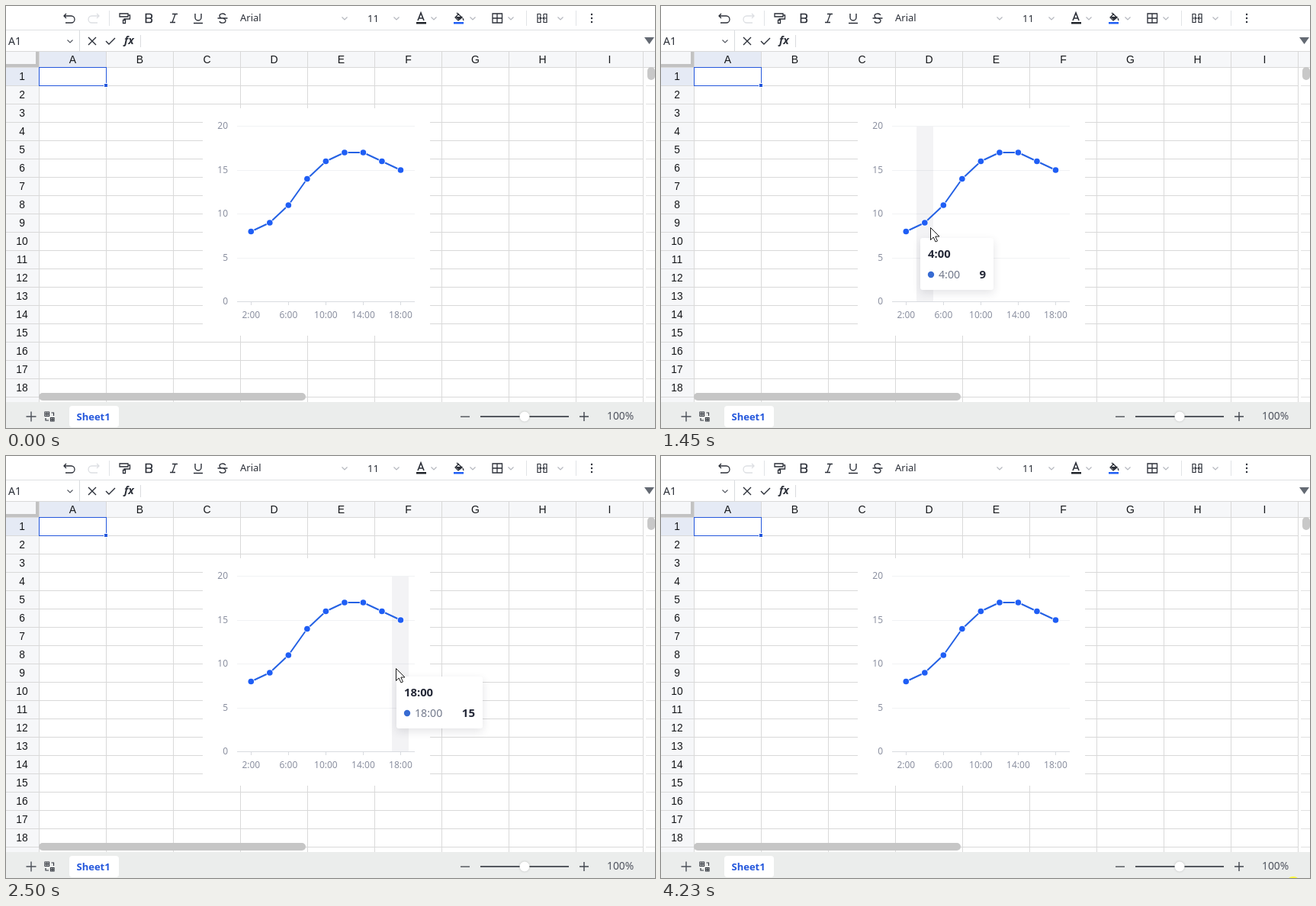
An HTML page with a canvas for the animation above (4360 ms loop, 851 by 553 pixels).

```html
<!DOCTYPE html>
<html lang="en">
<head>
<meta charset="utf-8">
<title>Spreadsheet chart hover</title>
<style>
html, body { margin: 0; width: 100%; height: 100%; overflow: hidden; background: #fff; }
canvas { display: block; }
</style>
</head>
<body>
<canvas id="stage" width="851" height="553"></canvas>
<script>
const W = 851, H = 553, LOOP = 4360;
const UI = '"Noto Sans", "Open Sans", sans-serif';
const GRID = '"Liberation Sans", Arial, sans-serif';
const BLUE = '#1f5ef5', INK = '#2b2f38', PALE = '#b4b7be', RULE = '#d9d9d9';
const values = [8, 9, 11, 14, 16, 17, 17, 16, 15];
const plot = { left: 303, right: 536, top: 157.5, bottom: 387.5 };

// Pointer path: time, x, y
const path = [
  [390, 196, 495], [540, 213, 395], [890, 278, 293], [1170, 298, 291],
  [1450, 353, 290], [1940, 442, 281], [2220, 484, 275], [2780, 541, 279],
  [3130, 605, 262], [3410, 705, 250], [3690, 826, 305], [3830, 837, 400],
  [3970, 839, 540]
];

const stage = document.getElementById('stage').getContext('2d');
const sheet = document.createElement('canvas');
sheet.width = W;
sheet.height = H;
let g = sheet.getContext('2d');

function rect(x, y, w, h, fill) {
  g.fillStyle = fill;
  g.fillRect(x, y, w, h);
}

function round(x, y, w, h, r, fill) {
  g.fillStyle = fill;
  g.beginPath();
  g.roundRect(x, y, w, h, r);
  g.fill();
}

function circle(x, y, r, fill) {
  g.fillStyle = fill;
  g.beginPath();
  g.arc(x, y, r, 0, Math.PI * 2);
  g.fill();
}

function text(str, x, y, font, fill, align = 'left') {
  g.font = font;
  g.fillStyle = fill;
  g.textAlign = align;
  g.fillText(str, x, y);
}

function draw(d, x = 0, y = 0, color = INK, width = 1.3) {
  g.save();
  g.translate(x, y);
  g.strokeStyle = color;
  g.lineWidth = width;
  g.stroke(new Path2D(d));
  g.restore();
}

const chevron = (x, y, color = PALE) => draw('M-3.5-1.5 0 2 3.5-1.5', x, y, color, 1.2);
const pointX = i => 321.3 + i * 24.52;
const pointY = v => plot.bottom - v * 11.5;
const hour = i => (i * 2 + 2) + ':00';

function drawToolbar() {
  draw('M-4-6-7-3-4 0M-7-3H2.5A4.4 4.4 0 0 1 2.5 6H-5', 83, 16);
  draw('M4-6 7-3 4 0M7-3H-2.5A4.4 4.4 0 0 0-2.5 6H5', 115, 16, '#dddfe3');
  for (const x of [135, 682, 747]) rect(x, 6, 1, 20, '#e1e3e6');

  draw('M-6.500-5.500H4.500V-1.500H-6.500ZM4.500-3.500H7V1.500H-.5V3M-2 3H1V7H-2Z', 155.5, 15.5);
  draw('M-4-5.500H1A2.700 2.700 0 0 1 1 0H-4ZM-4 0H1.500A2.800 2.800 0 0 1 1.500 5.500H-4Z', 187.5, 16, INK, 1.7);
  draw('M-2-5.500H5M-5 5.500H2M2-5.500-2 5.500', 220, 16);
  draw('M-4-6V-1A4 4 0 0 0 4-1V-6M-6 6.500H6', 252, 16, INK, 1.4);
  draw('M4-4C2-7-4-6.500-4-3C-4-1-2 0 0 0C3 1 4 2 4 3C4 7-3 7-4 4M-6.500 0H6.500', 284, 16);

  text('Arial', 307, 20, '13px ' + UI, INK);
  text('11', 474, 21, '13px ' + UI, INK);
  for (const x of [444, 512, 561, 612, 662, 727]) chevron(x, 16);

  draw('M-4 4 0-6 4 4M-2.600 1H2.600', 544, 15, INK, 1.6);
  rect(538, 21, 13, 2.500, '#1f2329');
  g.fillStyle = INK;
  g.fill(new Path2D('M589 14H599L594 18.500Z'));
  draw('M-3-6 4 0-1 4-5 0 0-5M5 1 6 4', 594, 15);
  rect(587, 21, 13, 2.500, BLUE);
  draw('M-6-6H6.500V6H-6ZM0-6V6M-6 0H6.500', 644, 16);
  draw('M-2-5.500H-6V5.500H-2V2.500M-2-5.500V-2.500M2-5.500H6V5.500H2V2.500M2-5.500V-2.500M-6 0H-1M1 0H6M-3-2-1 0-3 2M3-2 1 0 3 2', 703, 16, INK, 1.2);
  for (const y of [11, 16, 21]) circle(768, y, 1.2, INK);

  rect(0, 31, W, 1, '#dfe1e4');
  text('A1', 3, 51, '14px ' + UI, INK);
  chevron(84, 46, '#555962');
  rect(96, 32, 1, 27, '#d9dbde');
  draw('M-5-5 5 5M5-5-5 5', 113, 46, INK, 1.4);
  draw('M-6 0-2 4 6-4', 137, 46, INK, 1.4);
  text('fx', 155, 50, 'italic 600 14px ' + UI, INK);
  rect(176, 38, 1, 16, '#d9dbde');
  g.fillStyle = '#646a73';
  g.fill(new Path2D('M837 41H850L843.500 50Z'));
  rect(0, 59, W, 1, RULE);
}

function drawCells() {
  rect(0, 60, W, 20, '#f6f7f9');
  rect(0, 80, 43, 439, '#f6f7f9');
  rect(44, 60, 87, 20, '#e5eaf5');
  rect(0, 81, 43, 23, '#e5eaf5');
  rect(0, 80, W, 1, RULE);
  rect(43, 60, 1, 459, RULE);

  for (let c = 0; c < 9; c++) {
    const x = 43 + c * 88;
    rect(x + 88, 60, 1, 459, RULE);
    text('ABCDEFGHI'[c], x + 44.5, 75, '14px ' + GRID, '#15171a', 'center');
  }
  for (let r = 0; r < 18; r++) {
    const y = 80 + r * 24;
    rect(0, y + 24, 836, 1, RULE);
    rect(839, y + 24, 12, 1, '#e1e1e1');
    text(r + 1, 21, y + 17, '13.8px ' + GRID, '#15171a', 'center');
  }
  rect(39, 60, 4, 20, '#c2c2c2');
  rect(0, 76, 43, 4, '#c2c2c2');

  g.strokeStyle = '#2457dc';
  g.lineWidth = 1;
  g.strokeRect(43.5, 80.5, 88, 24);
  rect(128, 101, 6, 6, '#fff');
  rect(129, 102, 4, 4, '#2457dc');
  round(841, 80, 10, 17, 5, '#c8c8c8');
  round(43, 507, 350, 10, 5, '#c6c6c6');
}

function drawFooter() {
  rect(0, 519, W, 34, '#ebedec');
  draw('M-6.500 0H6.500M0-6.500V6.500', 33, 538, '#4c5059', 1.4);
  draw('M-6-6H-.5V-.5H-6ZM-3.300-6V-.5M-6-3.300H-.5M1.500 1.500H6V6H1.500ZM3.800 1.500V6M1.500 3.800H6M2.500-5H5.500V-1M-5 2V5H-1', 57, 538, '#363a42', 1.2);
  round(83, 524, 65, 28, 4, '#fff');
  text('Sheet1', 92.5, 543, 'bold 13px ' + UI, '#2457dc');
  rect(596, 537.500, 12, 1.3, '#42464e');
  rect(622, 537, 116, 2, '#54585f');
  g.save();
  g.shadowColor = 'rgba(0,0,0,.2)';
  g.shadowBlur = 3;
  circle(680, 538, 6.5, '#fff');
  g.restore();
  draw('M-6 0H6M0-6V6', 758, 538, '#42464e', 1.4);
  text('100%', 788, 542, '13.800px ' + UI, '#50545f');
}

function drawChart(active) {
  rect(258, 134, 298, 298, '#fff');
  for (let v = 0; v <= 20; v += 5) {
    const y = Math.floor(pointY(v));
    if (v) rect(plot.left, y, 233, 1, '#f1f2f4');
    text(v, 291, y + 4, '12px ' + UI, '#8b90a0', 'right');
  }
  if (active >= 0) {
    rect(Math.round(pointX(active) - 11), 158, 22, 229, 'rgba(30,35,60,.05)');
  }
  rect(plot.left, 387, 233, 1, '#d9dbe0');
  for (let i = 0; i < values.length; i += 2) {
    rect(Math.floor(pointX(i)), 388, 1, 4, '#d9dbe0');
    text(hour(i), pointX(i), 409, '12px ' + UI, '#8b90a0', 'center');
  }
  g.beginPath();
  values.forEach((v, i) => g.lineTo(pointX(i), pointY(v)));
  g.strokeStyle = '#2461e4';
  g.lineWidth = 2;
  g.lineJoin = 'round';
  g.stroke();
  values.forEach((v, i) => {
    circle(pointX(i), pointY(v), 4.7, '#fff');
    circle(pointX(i), pointY(v), 3.8, BLUE);
  });
}

function drawTooltip(x, y, i) {
  const label = hour(i), value = String(values[i]);
  const w = 96 + (label.length - 4) * 8 + (value.length - 1) * 9;
  g.save();
  g.shadowColor = 'rgba(30,35,50,.12)';
  g.shadowBlur = 12;
  g.shadowOffsetY = 4;
  round(x, y, w, 68, 3, '#fff');
  g.restore();
  text(label, x + 10, y + 26, 'bold 14.800px ' + UI, '#252938');
  circle(x + 14, y + 48, 4.2, '#376bd2');
  text(label, x + 24, y + 53, '14.200px ' + UI, '#747b8d');
  text(value, x + w - 10, y + 53, 'bold 15px ' + UI, '#252938', 'right');
}

function drawPointer(x, y) {
  g.save();
  g.translate(x + 0.5, y + 0.5);
  const arrow = new Path2D('M0 0V16L3.700 12.500 6.500 18.500 9 17.400 6.300 11.500H11.500Z');
  g.fillStyle = '#fff';
  g.fill(arrow);
  g.strokeStyle = '#1c1c1c';
  g.lineWidth = 1;
  g.stroke(arrow);
  g.restore();
}

function slope(i, k) {
  const a = path[Math.max(i - 1, 0)], b = path[Math.min(i + 1, path.length - 1)];
  return (b[k] - a[k]) / (b[0] - a[0]);
}

function pointerAt(t) {
  t = Math.min(Math.max(t, path[0][0]), path[path.length - 1][0]);
  let i = 0;
  while (i < path.length - 2 && t > path[i + 1][0]) i++;
  const a = path[i], b = path[i + 1], d = b[0] - a[0], u = (t - a[0]) / d;
  const u2 = u * u, u3 = u2 * u;
  return [1, 2].map(k => Math.round(
    (2 * u3 - 3 * u2 + 1) * a[k] + (u3 - 2 * u2 + u) * d * slope(i, k) +
    (3 * u2 - 2 * u3) * b[k] + (u3 - u2) * d * slope(i + 1, k)));
}

// The picture advances in steps of 70 ms
function step(t) {
  if (t < 470) return t < 390 ? 0 : 390;
  return 470 + Math.floor((t - 470) / 70) * 70;
}

function render(time) {
  const t = step(time);
  const [x, y] = pointerAt(t);
  const shown = time >= 390 && time < 4030;
  const hover = shown && x >= plot.left && x <= plot.right;
  const active = hover ? Math.min(8, Math.max(0, Math.round((x - pointX(0)) / 24.52))) : -1;

  g.drawImage(sheet, 0, 0);
  drawChart(active);
  if (hover) {
    const [tx, ty] = pointerAt(t - 110); // the tooltip trails the pointer
    drawTooltip(tx + 10, ty + 13, active);
  }
  if (shown) drawPointer(x, y);
  if (time >= 4230) circle(829, 561, 10, '#fdfb3c');
}

rect(0, 0, W, H, '#fff');
drawToolbar();
drawCells();
drawFooter();
g = stage;

const start = performance.now();
function tick() {
  render((performance.now() - start) % LOOP);
  requestAnimationFrame(tick);
}
tick();
</script>
</body>
</html>
```
